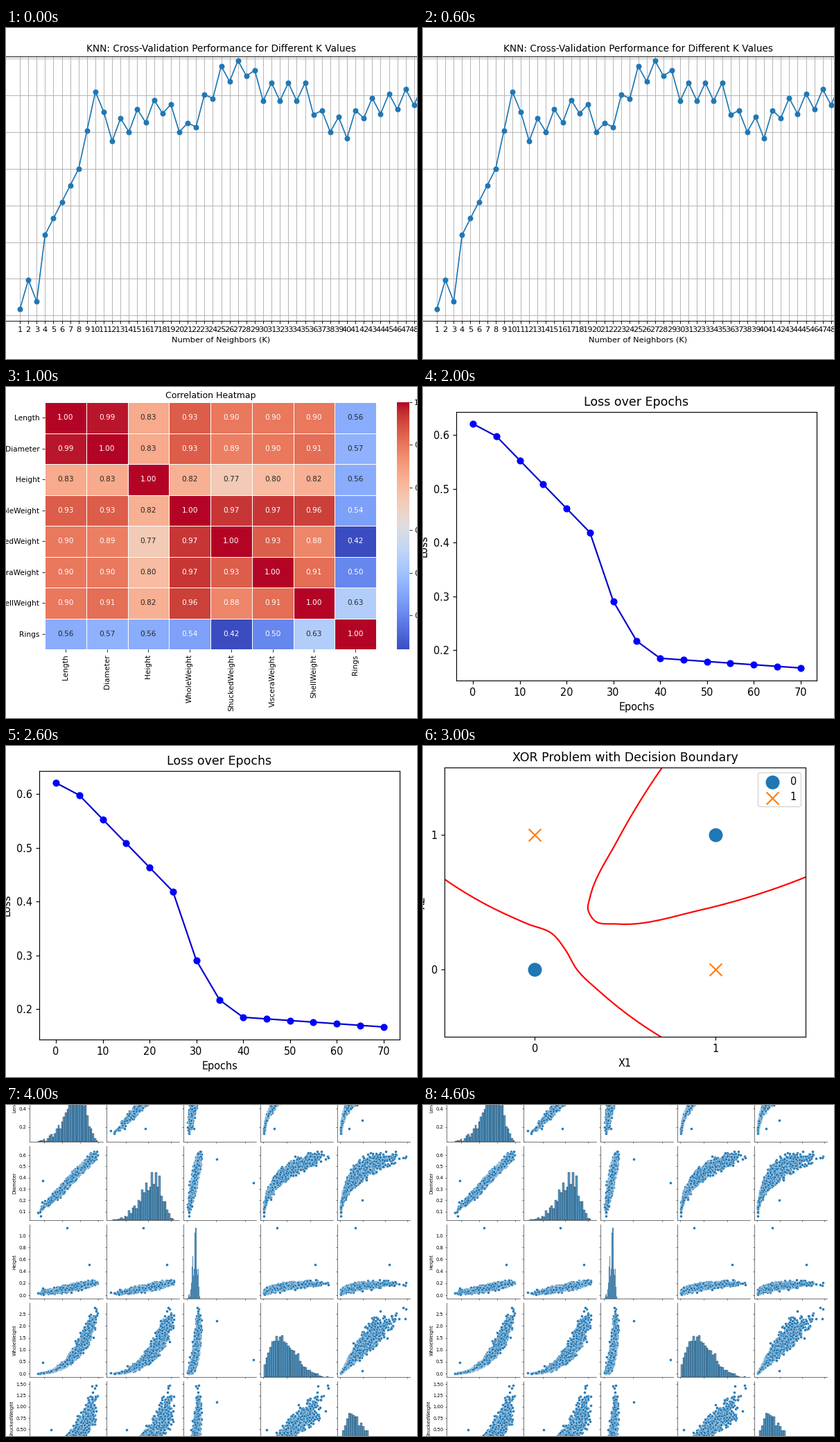
A matplotlib script for the animation above (5000 ms loop, 593 px wide and 477 px high).

```python
import numpy as np
import matplotlib.pyplot as plt
from matplotlib.animation import FuncAnimation

W, H = 593, 477
BLUE = "#1f77b4"
plt.rcParams["font.family"] = "DejaVu Sans"

# At 72 dpi one point equals one pixel.
fig = plt.figure(figsize=(W / 72, H / 72), dpi=72, facecolor="white")


def panel(x0, y0, x1, y1, em):
    """Axes over a pixel box (y down), with line weights scaled to the text size."""
    ax = fig.add_axes([x0 / W, 1 - y1 / H, (x1 - x0) / W, (y1 - y0) / H])
    ax.spines[:].set_linewidth(0.08 * em)
    style_ticks(ax, em)
    return ax


def style_ticks(ax, em):
    ax.tick_params(labelsize=em, length=0.35 * em, width=0.08 * em, pad=0.35 * em)


def label(ax, em, title="", x="", y=""):
    ax.set_title(title, fontsize=1.2 * em, pad=0.6 * em)
    ax.set_xlabel(x, fontsize=em, labelpad=0.4 * em)
    ax.set_ylabel(y, fontsize=em, labelpad=0.4 * em)


def dotted(ax, x, y, em, line, dot):
    ax.plot(x, y, "o-", color=line, mfc=dot, mec=dot,
            lw=0.15 * em, ms=0.6 * em, mew=0.1 * em)


def smooth(points, steps=20):
    """Hermite curve through the points."""
    p = np.array(points, float)
    t = np.r_[0, np.cumsum(np.hypot(*np.diff(p, axis=0).T))]
    m = np.gradient(p, t, axis=0, edge_order=2)
    u = np.linspace(0, 1, steps)[:, None]
    parts = []
    for i in range(len(p) - 1):
        h = t[i + 1] - t[i]
        parts.append((2 * u**3 - 3 * u**2 + 1) * p[i] + (u**3 - 2 * u**2 + u) * h * m[i]
                     + (3 * u**2 - 2 * u**3) * p[i + 1] + (u**3 - u**2) * h * m[i + 1])
    return np.vstack(parts)


def knn_scene():
    em, step = 11.4, 12.106
    ax = panel(-9, 41, 630, 422, em)
    k = np.arange(1, 50)
    # Score as pixel depth: a steep climb, then a slow drift with an odd/even zigzag.
    turns = [1, 2, 3, 4, 8, 10, 12, 18, 21, 25, 28, 30, 35, 37, 40, 42, 49]
    depth = [405, 363, 394, 298, 203, 92, 150, 110, 150, 68, 56, 92, 92, 132, 146,
             117, 95]
    score = np.interp(k, turns, depth) + np.where(k > 11, 13 * (-1.0) ** k, 0)
    ax.set_xlim(1 - 29.1 / step, 49 + 29.1 / step)
    ax.set_ylim(422, 41)
    ax.set_xticks(k)
    ax.set_yticks(44.3 + 52.85 * np.arange(8))
    ax.grid(color="#b0b0b0", lw=0.08 * em)
    dotted(ax, k, score, em, BLUE, BLUE)
    label(ax, em, "KNN: Cross-Validation Performance for Different K Values",
          "Number of Neighbors (K)")
    return [ax]


def heatmap_scene():
    em = 10.45
    names = ["Length", "Diameter", "Height", "WholeWeight", "ShuckedWeight",
             "VisceraWeight", "ShellWeight", "Rings"]
    upper = [99, 83, 93, 90, 90, 90, 56, 83, 93, 89, 90, 91, 57, 82, 77, 80, 82, 56,
             97, 97, 96, 54, 93, 88, 42, 91, 50, 63]
    corr = np.eye(8)
    corr[np.triu_indices(8, 1)] = np.array(upper) / 100
    corr = np.maximum(corr, corr.T)

    ax = panel(56, 22, 534, 378, em)
    mesh = ax.pcolormesh(corr, cmap="coolwarm", vmin=0.42, vmax=1,
                         edgecolors="white", linewidth=0.6)
    ax.invert_yaxis()
    centres = np.arange(8) + 0.5
    ax.set_xticks(centres, names, rotation=90)
    ax.set_yticks(centres, names)
    ax.spines[:].set_visible(False)
    for (r, c), v in np.ndenumerate(corr):
        rgb = np.array(mesh.cmap(mesh.norm(v))[:3])
        lin = np.where(rgb <= 0.03928, rgb / 12.92, ((rgb + 0.055) / 1.055) ** 2.4)
        pale = lin @ [0.2126, 0.7152, 0.0722] > 0.408
        ax.text(c + 0.5, r + 0.5, f"{v:.2f}", ha="center", va="center",
                fontsize=em, color="0.15" if pale else "white")
    label(ax, em, "Correlation Heatmap")

    bar = panel(564, 22, 581.5, 378, em)
    fig.colorbar(mesh, cax=bar, ticks=np.arange(5, 11) / 10).outline.set_visible(False)
    style_ticks(bar, em)
    return [ax, bar]


def loss_scene():
    em = 14.53
    ax = panel(48, 36, 568, 423, em)
    epochs = np.arange(0, 71, 5)
    loss = np.interp(epochs, [0, 5, 25, 30, 35, 40, 70],
                     [0.621, 0.598, 0.419, 0.291, 0.217, 0.185, 0.167])
    ax.set_xlim(-3.55, 73.45)
    ax.set_ylim(0.1436, 0.643)
    ax.set_yticks(np.arange(2, 7) / 10)
    dotted(ax, epochs, loss, em, "mediumblue", "blue")
    label(ax, em, "Loss over Epochs", "Epochs", "Loss")
    return [ax]


def xor_scene():
    em = 14.53
    ax = panel(31, 31, 552, 419, em)
    low = [(31, 192), (90, 228), (150, 256), (187, 271), (205, 293), (222, 322),
           (255, 354), (343, 419)]
    high = [(345, 31), (280, 137), (241, 218), (238, 235), (248, 252), (280, 256.5),
            (400, 236.5), (552, 189)]
    for points in (low, high):
        x, y = smooth(points).T
        ax.plot((x - 161.25) / 260.5, (322 - y) / 194, color="red", lw=0.15 * em)
    style = dict(s=150 * (em / 10) ** 2, linewidths=0.15 * em, zorder=3)
    ax.scatter([0, 1], [0, 1], marker="o", color=BLUE, label="0", **style)
    ax.scatter([0, 1], [1, 0], marker="x", color="#ff7f0e", label="1", **style)
    ax.set(xlim=(-0.5, 1.5), ylim=(-0.5, 1.5), xticks=[0, 1], yticks=[0, 1])
    box = ax.legend(loc="upper right", fontsize=em)
    box.get_frame().set_linewidth(0.1 * em)
    label(ax, em, "XOR Problem with Decision Boundary", "X1", "X2")
    return [ax]


def shells(lo, hi, n=2400):
    """Simulated shell measurements plus a few stray specimens."""
    rng = np.random.default_rng(4)
    spread = lambda s: np.exp(rng.normal(0, s, n))
    dia = 0.69 - rng.gamma(8, 0.034, n)
    length = 0.0357 + 1.197 * dia + rng.normal(0, 0.022, n)
    height = 0.346 * dia - 0.002 + rng.normal(0, 0.019, n)
    whole = 5.2 * length**3 * spread(0.13)
    meat = 0.43 * whole * spread(0.17)
    size = np.round(np.c_[length, dia, height] / 0.005) * 0.005
    body = np.c_[size, whole, meat]
    body = body[((body > lo) & (body < hi)).all(axis=1)]
    stray = [(0.185, 0.375, 0.12, 0.46, 0.2), (0.455, 0.355, 1.13, 0.59, 0.33),
             (0.705, 0.565, 0.515, 2.21, 1.1), (0.275, 0.205, 0.07, 0.12, 0.49)]
    return np.vstack([body, stray])


def pairs_scene():
    em = 6.7
    names = ["Length", "Diameter", "Height", "WholeWeight", "ShuckedWeight"]
    lo = np.array([0.075, 0.055, 0, 0, 0])
    hi = np.array([0.815, 0.65, 1.13, 2.83, 1.49])
    xstep, ystep = [0.2, 0.2, 0.5, 1, 0.5], [0.2, 0.1, 0.2, 0.5, 0.25]
    bins, peak = [33, 33, 150, 33, 33], [69, 69, 102, 60, 61]
    data = shells(lo, hi)
    pad = 0.05 * (hi - lo)
    lo, hi = lo - pad, hi + pad

    def ticks(i, step):
        return np.arange(np.ceil(lo[i] / step), np.floor(hi[i] / step) + 1) * step

    axes = []
    for r in range(5):
        for c in range(5):
            x, y = 34 + 110.9 * c, -54 + 113 * r
            box = (x, y, x + 105.5, y + 107)
            ax = panel(*box, em)
            axes.append(ax)
            ax.spines[["top", "right"]].set_visible(False)
            ax.tick_params(labelbottom=False, labelleft=c == 0)
            ax.set_xticks(ticks(c, xstep[c]))
            ax.set_yticks(ticks(r, ystep[r]))
            ax.set(xlim=(lo[c], hi[c]), ylim=(lo[r], hi[r]))
            if c == 0:
                label(ax, em, y=names[r])
            if r != c:
                ax.scatter(data[:, c], data[:, r], s=14.5, color=BLUE,
                           edgecolors="white", linewidths=0.33)
                continue
            hist = panel(*box, em)
            axes.append(hist)
            hist.axis("off")
            n, edge = np.histogram(data[:, c], bins[c])
            hist.bar(edge[:-1], n * peak[c] / n.max(), np.diff(edge), align="edge",
                     color=(0.122, 0.467, 0.706, 0.75), edgecolor="black",
                     linewidth=0.06 if c == 2 else 0.28)
            hist.set(xlim=(lo[c], hi[c]), ylim=(0, 107))
    return axes


scenes = [knn_scene(), heatmap_scene(), loss_scene(), xor_scene(), pairs_scene()]


def show(i):
    for k, axes in enumerate(scenes):
        for ax in axes:
            ax.set_visible(k == i)
    return []


anim = FuncAnimation(fig, show, frames=len(scenes), init_func=lambda: show(0),
                     interval=1000, repeat=True, repeat_delay=0, blit=False)
plt.show()
```
